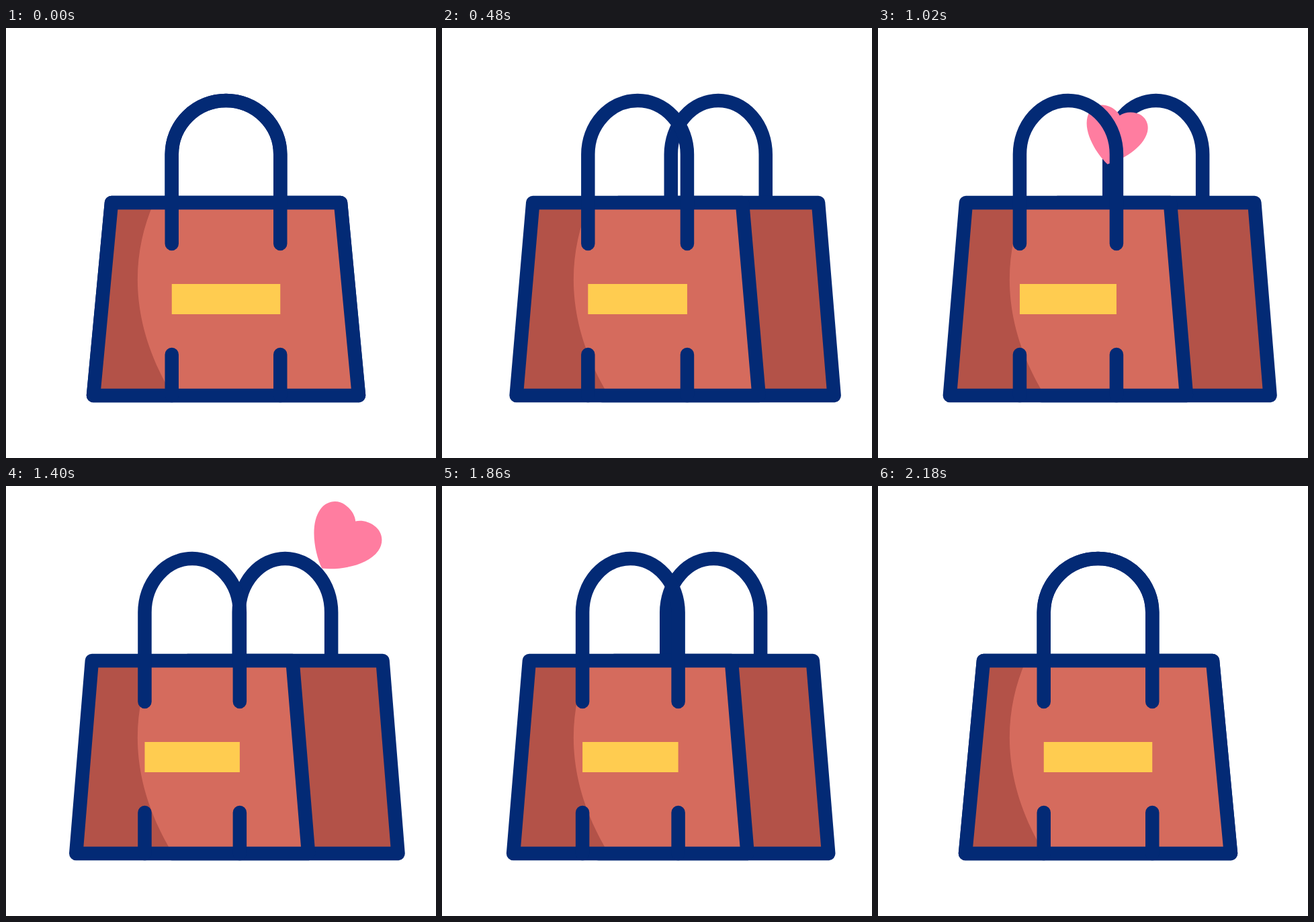
Write an HTML page that moves like this. It is 640 px wide and 640 px high and loops after 2400 ms.

```html
<!DOCTYPE html>
<html lang="en">
<head>
<meta charset="utf-8">
<title>Shopping bags</title>
<style>
  html, body { margin: 0; width: 100%; height: 100%; overflow: hidden; background: #fff; }
  svg { display: block; width: 100%; height: 100%; }
  .line { fill: none; stroke: #032a75; stroke-width: 20.5; stroke-linecap: round; stroke-linejoin: round; }
  .light { fill: #d56b5d; }
  .dark { fill: #b35248; }
</style>
</head>
<body>
<svg viewBox="0 0 640 640">
  <defs><clipPath id="clip"><path id="clipBody"/></clipPath></defs>
  <path id="backHandle" class="line"/>
  <path id="backFill" class="dark"/>
  <path id="backEdge" class="line"/>
  <path id="heart" fill="#ff7da0"
    d="M0 50C-22 38-53 8-53-20C-53-36-41-47-27-47C-16-47-6-43 0-36C6-43 16-47 27-47C41-47 53-36 53-20C53 8 22 38 0 50Z"/>
  <path id="frontFill" class="light"/>
  <path class="dark" clip-path="url(#clip)" d="M220 260C185 340 183 440 248 547H60V260Z"/>
  <rect id="label" y="381" height="45" fill="#ffcc50"/>
  <path id="frontEdge" class="line"/>
  <path id="frontLines" class="line"/>
</svg>
<script>
const LOOP = 2400, OPEN_END = 470, CLOSE_START = 1703, CLOSE_END = 2178;
const CENTER = 327.5;
const $ = id => document.getElementById(id);
const clamp = v => Math.min(1, Math.max(0, v));
const part = (t, a, b) => clamp((t - a) / (b - a));
const mix = (a, b, p) => a + (b - a) * p;
const smooth = p => p * p * (3 - 2 * p);

// cubic-bezier(.67, 0, .33, 1), solved by bisection
function ease(x) {
  let lo = 0, hi = 1;
  for (let i = 0; i < 24; i++) {
    const s = (lo + hi) / 2, r = 1 - s;
    if (2.01 * s * r * r + 0.99 * s * s * r + s * s * s < x) lo = s; else hi = s;
  }
  return smooth((lo + hi) / 2);
}

// Fast opening, slow linear drift, fast closing
function spread(t, opened, drifted) {
  if (t < OPEN_END) return opened * ease(t / OPEN_END);
  if (t < CLOSE_START) return mix(opened, drifted, part(t, OPEN_END, CLOSE_START));
  return drifted * (1 - ease(part(t, CLOSE_START, CLOSE_END)));
}

function bag(shift, shrink) {
  const cx = CENTER + shift, k = 1 - shrink;
  const top = 170.5 * k, base = 197.5 * k, grip = 80.75 * k;
  const left = cx - grip, right = cx + grip;
  return {
    left, right,
    body: `M${cx - top} 260H${cx + top}L${cx + base} 547H${cx - base}Z`,
    handle: end => `M${left} ${end}V188A${grip} 80 0 0 1 ${right} 188V${end}`
  };
}

function setPath(d, ...ids) {
  for (const id of ids) $(id).setAttribute("d", d);
}

function drawHeart(t) {
  const dt = t - 1400;
  const x = 499 + 0.286 * dt - 0.000268 * dt * dt;
  const y = 77.8 + 0.000346 * Math.min(0, t - 1510) ** 2;
  const turn = 35.5 + 0.0566 * dt;
  const grow = 1 - (1 - part(t, 870, 1250)) ** 4;
  const size = grow * (1 - smooth(part(t, 1680, 1840)));
  $("heart").setAttribute("visibility", size > 0 ? "visible" : "hidden");
  $("heart").setAttribute("transform", `translate(${x} ${y}) rotate(${turn}) scale(${size})`);
}

function draw(t) {
  const front = bag(-spread(t, 36.2, 54.9), spread(t, 0.0855, 0.137));
  const back = bag(spread(t, 83.7, 89.3), spread(t, 0.127, 0.156));
  setPath(back.handle(260), "backHandle");
  setPath(back.body, "backFill", "backEdge");
  setPath(front.body, "frontFill", "frontEdge", "clipBody");
  setPath(front.handle(321) + `M${front.left} 547V486M${front.right} 547V486`, "frontLines");
  $("label").setAttribute("x", front.left);
  $("label").setAttribute("width", front.right - front.left);
  drawHeart(t);
}

const start = performance.now();
function tick() {
  draw((performance.now() - start) % LOOP);
  requestAnimationFrame(tick);
}
tick();
</script>
</body>
</html>
```
